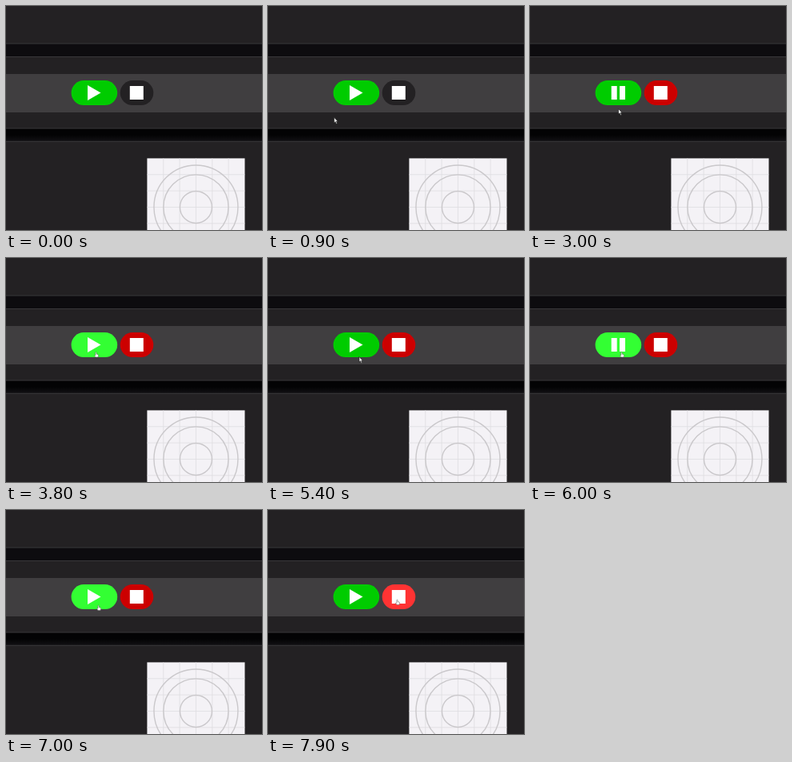
Recreate the animation shown at these times as an HTML page. Size 320 px wide and 280 px high, loop 8000 ms.

```html
<!DOCTYPE html>
<html lang="en">
<head>
<meta charset="utf-8">
<title>Playback buttons</title>
<style>
html, body { margin: 0; width: 100%; height: 100%; overflow: hidden; background: #232123; }
svg { display: block; width: 320px; height: 280px; }
</style>
</head>
<body>
<svg viewBox="0 0 320 280">
  <defs>
    <linearGradient id="gap" x2="0" y2="1">
      <stop offset=".5" stop-color="#030304"/>
      <stop offset="1" stop-color="#111013"/>
    </linearGradient>
  </defs>
  <rect width="320" height="280" fill="#232123"/>
  <rect y="46.5" width="320" height="17.5" fill="#39383a"/>
  <rect y="47.5" width="320" height="15.5" fill="#0d0c0f"/>
  <rect y="85" width="320" height="48" fill="#403e40"/>
  <rect y="152.5" width="320" height="17.3" fill="#39383a"/>
  <rect y="153.5" width="320" height="15.3" fill="url(#gap)"/>

  <rect x="176.4" y="190.4" width="122.1" height="122.1" fill="#f4f2f6"/>
  <path id="grid" stroke="#dfdde1" stroke-width=".8"/>
  <g id="rings" fill="none" stroke="#cac8cb" stroke-width="1.4"></g>

  <rect id="play" x="81.6" y="93.1" width="57.6" height="31" rx="15.5"/>
  <rect id="stop" x="142.7" y="93.1" width="41.6" height="31" rx="15.5"/>
  <g fill="#fff">
    <path id="playIcon" d="M102 99L118.5 108.5L102 118Z"/>
    <path id="pauseIcon" d="M101.7 100h7v17h-7zM112 100h7v17h-7z"/>
    <rect x="154.8" y="100" width="17" height="17"/>
  </g>

  <g id="cursor" fill="#fff" stroke-linejoin="round">
    <path id="arrow" stroke="#222" stroke-width=".7" d="M0 0V6.6L1.5 5.3L2.6 7.9L3.8 7.4L2.7 4.9H4.6Z"/>
    <path id="hand" stroke="#555" stroke-width=".5" d="M-.6 .6Q0 -.3 .6 .6V2.6L2.8 3.2Q3.4 4 2.6 6.4H-.6L-2 4.2L-.6 4Z"/>
  </g>
</svg>
<script>
const LOOP = 8000, STEP = 100;
const START = { x: 44.5, y: 183 };

// the pointer rests between moves; a click toggles play and pause
const moves = [
  { from: 500, to: 1200, x: 107.5, y: 111 },
  { from: 2400, to: 2800, x: 110.5, y: 128.5 },
  { from: 3200, to: 3600, x: 112.5, y: 117.5 },
  { from: 4000, to: 4500, x: 113.5, y: 129.5 },
  { from: 5200, to: 5600, x: 114.5, y: 117.5 },
  { from: 6100, to: 6400, x: 115, y: 128.5 },
  { from: 6500, to: 6800, x: 115.5, y: 119 },
  { from: 7000, to: 7900, x: 161.5, y: 112 }
];
const clicks = [1800, 3700, 5900, 6900];

const el = id => document.getElementById(id);
const show = (id, on) => el(id).setAttribute("visibility", on ? "visible" : "hidden");
const fill = (id, color) => el(id).setAttribute("fill", color);
const ease = k => k * k * (3 - 2 * k);

function drawSheet() {
  const left = 176.4, top = 190.4, size = 122.1;
  let lines = "";
  for (let i = 1; i < 6; i++) {
    const d = size * i / 6;
    lines += `M${left + d} ${top}v${size}M${left} ${top + d}h${size}`;
  }
  el("grid").setAttribute("d", lines);
  el("rings").innerHTML = [52.5, 40.6, 20].map(r =>
    `<circle cx="${left + size / 2}" cy="${top + size / 2}" r="${r}"/>`).join("");
}

function pointerAt(t) {
  let { x, y } = START;
  for (const m of moves) {
    if (t < m.from) break;
    const k = ease(Math.min(1, (t - m.from) / (m.to - m.from)));
    x += (m.x - x) * k;
    y += (m.y - y) * k;
  }
  return { x, y };
}

function draw(now) {
  const t = Math.floor((now % LOOP) / STEP) * STEP;
  const { x, y } = pointerAt(t);
  const count = clicks.filter(c => c <= t).length;
  const playing = count % 2 === 1;
  const within = (left, right) => x >= left && x <= right && y >= 93 && y < 123;
  const onPlay = within(82, 139), onStop = within(143, 184);
  const visible = t >= moves[0].from, hover = onPlay || onStop;

  fill("play", onPlay ? "#33ff33" : "#00cc00");
  fill("stop", !count ? "#232123" : onStop ? "#ff3333" : "#cc0000");
  show("playIcon", !playing);
  show("pauseIcon", playing);
  show("arrow", visible && !hover);
  show("hand", visible && hover);
  el("cursor").setAttribute("transform", `translate(${x} ${y})`);
}

function tick() {
  draw(performance.now());
  requestAnimationFrame(tick);
}
drawSheet();
tick();
</script>
</body>
</html>
```
